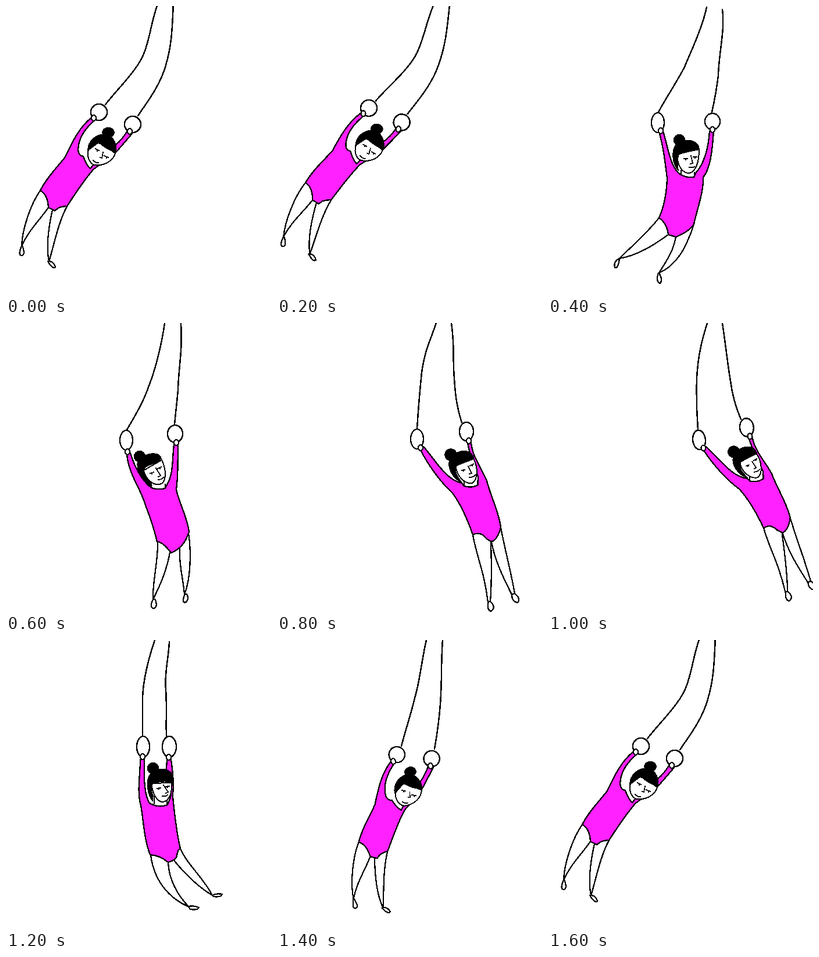
An HTML page that plays this animation: 456x498 px, repeating every 1800 ms.

```html
<!DOCTYPE html>
<html lang="en">
<head>
<meta charset="utf-8">
<title>Gymnast on rings</title>
<style>
html, body { margin: 0; width: 100%; height: 100%; overflow: hidden; background: #fff; }
svg { display: block; width: 456px; height: 498px; }
g { fill: #fff; stroke: #000; stroke-width: 2.3; stroke-linejoin: round; stroke-linecap: round; }
.rope, .ring { fill: none; stroke-width: 2.5; }
.suit { fill: #ff21ff; }
.face { stroke-width: 2; }
.hair { fill: #000; stroke-width: 1.5; }
.lines { fill: none; stroke-width: 1.8; }
</style>
</head>
<body>
<svg id="stage" viewBox="0 0 456 498" shape-rendering="crispEdges"></svg>
<script>
// rings: [cx, cy, rx, ry]; hands: [cx, cy]; bun: [cx, cy, rx, ry]
const backSwing = {
  rope: 'M262 -5C250 22 248 60 235 87C222 115 188 147 171 170M288 -5C286 35 286 65 275 102C266 135 245 163 227 189',
  rings: [[160, 183, 14, 14], [218, 204, 14, 14]],
  hands: [[151, 193], [213, 216]],
  legs: 'M59 318C42 342 28 385 27 413C40 385 59 368 73 347L80 320ZM80 351C74 378 68 412 74 440C82 415 89 375 105 345L90 330Z',
  feet: 'M27 413Q20 430 27 430Q34 429 28 413ZM74 440Q82 440 85 450Q80 454 72 440Z',
  suit: 'M146 193C126 210 115 232 102 260C88 278 69 297 59 318C67 322 72 332 73 347L84 353L90 348Q97 345 105 345C118 325 138 296 150 282C162 272 176 265 184 258Q200 240 217 220L209 215Q200 230 189 239L184 250L150 274L145 280Q138 274 133 259C123 258 123 247 126 235C130 220 142 206 153 196Z',
  face: 'M142 248C138 262 146 275 156 274C170 275 184 267 188 254C180 248 165 236 158 236Z',
  hair: 'M141 250C140 232 156 220 172 221C186 225 192 240 189 252C178 249 168 243 160 235C152 238 146 243 141 250Z',
  bun: [176, 218, 10, 8.5],
  lines: 'M154 246l6 3m-3-1v2M169 258l7 3m-3-1v2M167 252l-2 10l-3-1M150 266q5 5 9 4'
};
const legsTrailing = {
  rope: 'M273 2C266 36 247 76 235 105C220 134 202 160 190 183M300 6C305 40 294 80 293 120C290 145 286 165 282 183',
  rings: [[189, 201, 11, 17], [283, 199, 13, 14]],
  hands: [[194, 215], [283, 213]],
  legs: 'M191 365C172 390 146 412 123 435C155 430 185 410 207 394L215 375ZM220 398C215 425 203 440 191 460C215 450 232 425 240 405Q247 390 251 376L230 370Z',
  feet: 'M123 435Q112 440 115 451Q121 453 123 435ZM190 460Q185 475 193 478Q198 472 191 460Z',
  suit: 'M191 217C198 240 201 265 205 297C204 325 200 345 191 365Q205 375 207 394L220 398Q244 388 251 376C258 345 268 320 267 295C280 280 283 245 285 216L278 216C276 245 270 270 254 288L251 295Q238 296 229 291C210 280 206 240 198 216Z',
  face: 'M222 255C223 275 230 288 243 288C254 286 260 270 260 247Z',
  hair: 'M260 246C250 249 234 252 225 256Q221 268 224 283C214 272 212 250 220 239C230 228 258 228 260 246Z',
  bun: [226, 231, 9.5, 9.5],
  lines: 'M234 263h6m-3 0v2M250 260h6m-3 0v2M246 258l3 13l-4 1M243 278q6 1 9-1M229 283v8M252 287v7'
};
const hanging = {
  rope: 'M273 0C269 30 259 75 246 108C237 135 222 160 208 184M301 0C304 50 297 75 296 115C293 150 291 160 290 176',
  rings: [[207, 202, 11, 17], [291, 191, 13, 15]],
  hands: [[209, 222], [293, 206]],
  legs: 'M261 377C262 410 252 445 253 476C264 455 277 425 282 395L280 375ZM299 388C297 415 305 440 307 468C318 440 319 395 314 362L298 370Z',
  feet: 'M254 475Q246 488 253 492Q262 491 257 477ZM308 467Q302 481 308 482Q316 477 311 467Z',
  suit: 'M208 225C210 260 232 285 240 314C250 340 255 355 260 377Q270 377 284 396Q306 388 315 360C312 335 298 310 293 287C297 260 295 235 296 209L289 209C286 235 288 262 277 278L274 285Q262 288 250 284C235 272 222 250 214 224Z',
  face: 'M237 254C240 268 252 280 264 278C276 276 277 255 268 236Z',
  hair: 'M267 234C258 243 245 244 239 249C234 257 240 268 248 273L251 281C238 275 226 262 226 243C230 225 265 218 267 234Z',
  bun: [230, 230, 9.5, 9.5],
  lines: 'M248 259l6-2m-3 1v2M261 251l6-3m-2 1v2M258 250l8 13l-4 2M262 270q6 0 9-4M250 275v8M274 278v6'
};
const foreSwing = {
  rope: 'M274 0C262 35 255 45 249 85C246 115 243 150 241 182M300 0C306 40 302 60 305 95C307 130 311 150 318 172',
  rings: [[241, 200, 11, 17], [326, 187, 12, 16]],
  hands: [[247, 215], [330, 203]],
  legs: 'M337 365C344 405 356 425 363 481L367 480C370 445 369 410 368 377L355 345ZM369 377C375 410 390 440 404 468L409 466C403 430 392 390 385 352L365 350Z',
  feet: 'M364 480Q360 493 368 497Q378 490 367 480ZM404 468Q404 480 414 482Q420 475 409 466Z',
  suit: 'M246 217C260 245 282 275 302 293C318 315 330 345 337 365Q350 358 361 372L369 377Q380 373 385 352C382 325 368 300 361 272C352 250 336 230 334 206L328 207C332 228 340 248 346 265V279Q335 285 322 281L318 276C290 270 272 235 252 213Z',
  face: 'M308 246C308 262 322 278 336 276C346 270 346 248 338 234Z',
  hair: 'M339 234C325 240 312 243 308 247C305 258 311 265 318 275C302 268 293 250 297 236C306 218 335 214 339 234Z',
  bun: [299, 227, 10, 10],
  lines: 'M318 254l5-1m-2 0v2M332 246l6-3m-2 1v2M329 247l6 12l-4 1M331 266q7 0 10-4M322 274v7M345 272v7'
};
const returning = {
  rope: 'M256 0C246 30 236 65 235 100V166M281 3C280 30 272 60 275 85C277 115 275 140 276 166',
  rings: [[236, 184, 11, 18], [281, 184, 12, 18]],
  hands: [[235, 201], [280, 202]],
  legs: 'M249 371C255 415 280 445 315 460C295 440 280 412 279 383L265 350ZM290 381C310 405 330 425 355 440C340 410 310 385 300 359L285 360Z',
  feet: 'M314 459Q324 457 332 461Q330 466 317 464ZM355 440Q362 436 372 438Q370 444 357 442Z',
  suit: 'M231 206C231 235 225 260 232 285C237 315 238 345 248 370Q264 371 279 383Q292 380 294 372Q295 362 300 359C294 335 290 300 287 270C289 245 287 225 284 206H277L276 222L284 240L284 268L278 284Q262 290 247 281C238 268 237 235 238 206Z',
  face: 'M250 247C252 265 260 280 271 279C282 276 286 262 285 246Z',
  hair: 'M287 246C275 242 262 244 252 248Q248 260 253 268L252 277C243 265 241 245 246 235C254 219 284 216 288 238Z',
  bun: [253, 221, 9.5, 9.5],
  lines: 'M260 256l6-1m-3 0v2M275 253l6-1m-3 0v2M271 250l8 12l-4 2M269 269q6 1 9-2M255 270v12M277 277v7'
};

const swing = (x, y, angle, scale = 1, shift = 0) =>
  `translate(${x + shift} ${y}) rotate(${angle}) scale(${scale}) translate(${-x} ${-y})`;

const poses = [
  backSwing,
  { ...backSwing, move: swing(270, 0, 3.5, 1, 9), moveRope: true },
  legsTrailing,
  hanging,
  foreSwing,
  { ...foreSwing, move: swing(290, 25, -6, .985),
    rope: 'M274 0C263 35 258 60 256 95C255 130 256 155 258 184M300 0C306 40 309 70 314 100C318 130 325 150 332 166' },
  returning,
  { ...backSwing, move: swing(265, 0, -13.3, .977),
    rope: 'M257 0C248 40 246 70 237 100C230 130 221 155 214 183M285 0C282 40 284 75 281 110C279 140 275 165 271 188' }
];
const order = [0, 1, 2, 3, 4, 5, 6, 7, 0];
const STEP = 200;

const path = (cls, d) => `<path class="${cls}" d="${d}"/>`;
const oval = (cls, [cx, cy, rx = 4, ry = 5]) =>
  `<ellipse class="${cls}" cx="${cx}" cy="${cy}" rx="${rx}" ry="${ry}"/>`;

function drawPose(p) {
  const move = p.move || '';
  return `<g visibility="hidden">
    <g transform="${p.moveRope ? move : ''}">${path('rope', p.rope)}</g>
    <g transform="${move}">
      ${p.rings.map(r => oval('ring', r)).join('')}
      ${['legs', 'feet', 'suit', 'face', 'hair'].map(k => path(k, p[k])).join('')}
      ${oval('hair', p.bun)}${path('lines', p.lines)}
      ${p.hands.map(h => oval('hand', h)).join('')}
    </g></g>`;
}

const stage = document.getElementById('stage');
stage.innerHTML = poses.map(drawPose).join('');
const groups = [...stage.children];
const start = performance.now();

function tick() {
  const step = Math.floor((performance.now() - start) / STEP) % order.length;
  groups.forEach((g, i) => g.setAttribute('visibility', i === order[step] ? 'visible' : 'hidden'));
  requestAnimationFrame(tick);
}
tick();
</script>
</body>
</html>
```
